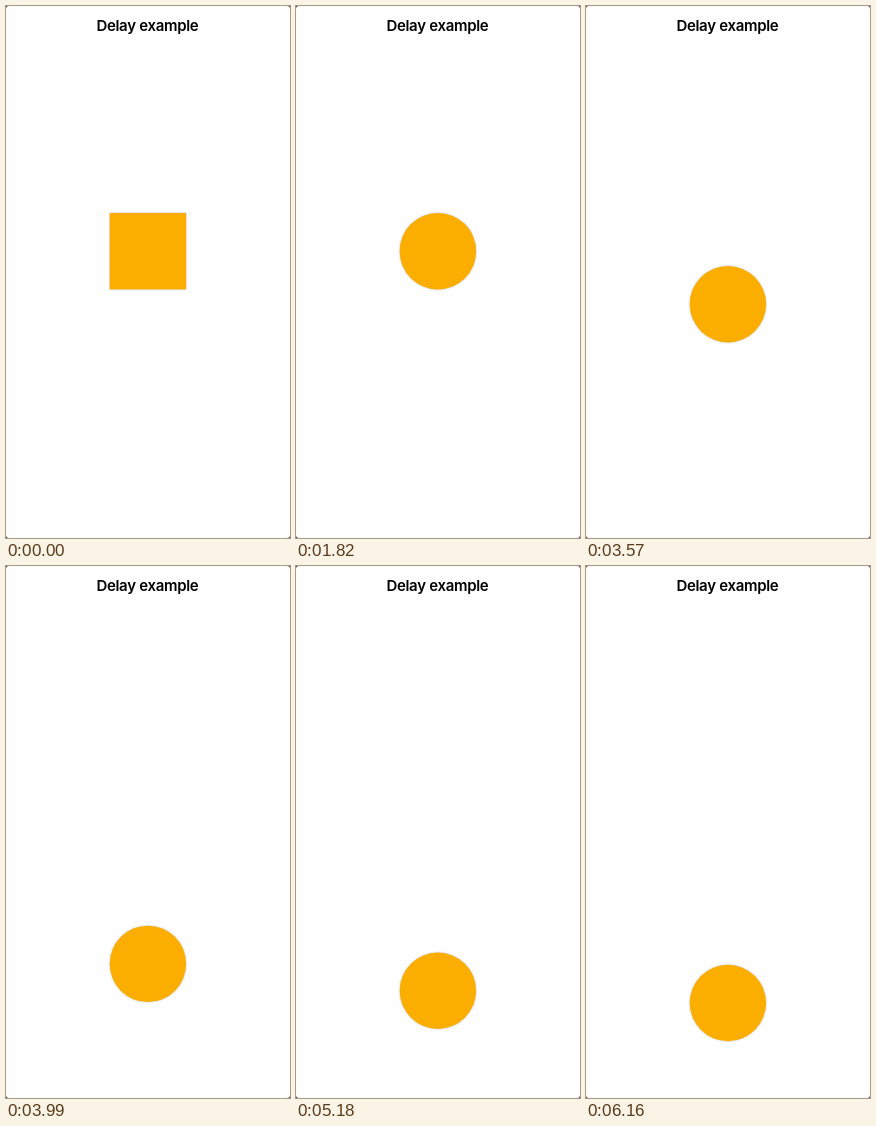
Recreate the animation shown at these times as an HTML page. Size 284 by 532 pixels, loop 6.58 s.

```html
<!DOCTYPE html>
<html lang="en">
<head>
<meta charset="utf-8">
<title>Delay example</title>
<style>
  html, body { margin: 0; width: 100%; height: 100%; overflow: hidden; background: #444; }
  svg { display: block; width: 284px; height: 532px; }
  text { font: 600 15px Inter, "Liberation Sans", sans-serif; letter-spacing: -0.3px; }
  #box { fill: #fbae00; filter: drop-shadow(0 0 1px rgba(100, 120, 140, 0.4)); }
</style>
</head>
<body>
<svg viewBox="0 0 284 532">
  <rect width="284" height="532" rx="3" fill="#fefefe"/>
  <text x="141.4" y="24.5" text-anchor="middle">Delay example</text>
  <rect id="box" x="103.7" y="207" width="76.4" height="76.4"/>
</svg>
<script>
const LOOP = 6580, STEP = 70;
const ROUND = { start: 835, length: 1050 };
const DROP = { start: 2968, length: 3150 };
const TOP = 207, FALL = 191.8, RADIUS = 38.2;
const box = document.getElementById('box');

const progress = (t, { start, length }) => Math.min(1, Math.max(0, (t - start) / length));

const inOutQuad = p => p < 0.5 ? 2 * p * p : 1 - 2 * (1 - p) ** 2;

function bounce(p) {
  const k = 7.5625, d = 2.75;
  if (p < 1 / d) return k * p * p;
  if (p < 2 / d) return k * (p - 1.5 / d) ** 2 + 0.75;
  if (p < 2.5 / d) return k * (p - 2.25 / d) ** 2 + 0.9375;
  return k * (p - 2.625 / d) ** 2 + 0.984375;
}

const origin = performance.now();

function draw() {
  const elapsed = (performance.now() - origin) % LOOP;
  const t = Math.floor(elapsed / STEP) * STEP;
  box.setAttribute('rx', RADIUS * inOutQuad(progress(t, ROUND)));
  box.setAttribute('y', TOP + FALL * bounce(progress(t, DROP)));
  requestAnimationFrame(draw);
}
draw();
</script>
</body>
</html>
```
